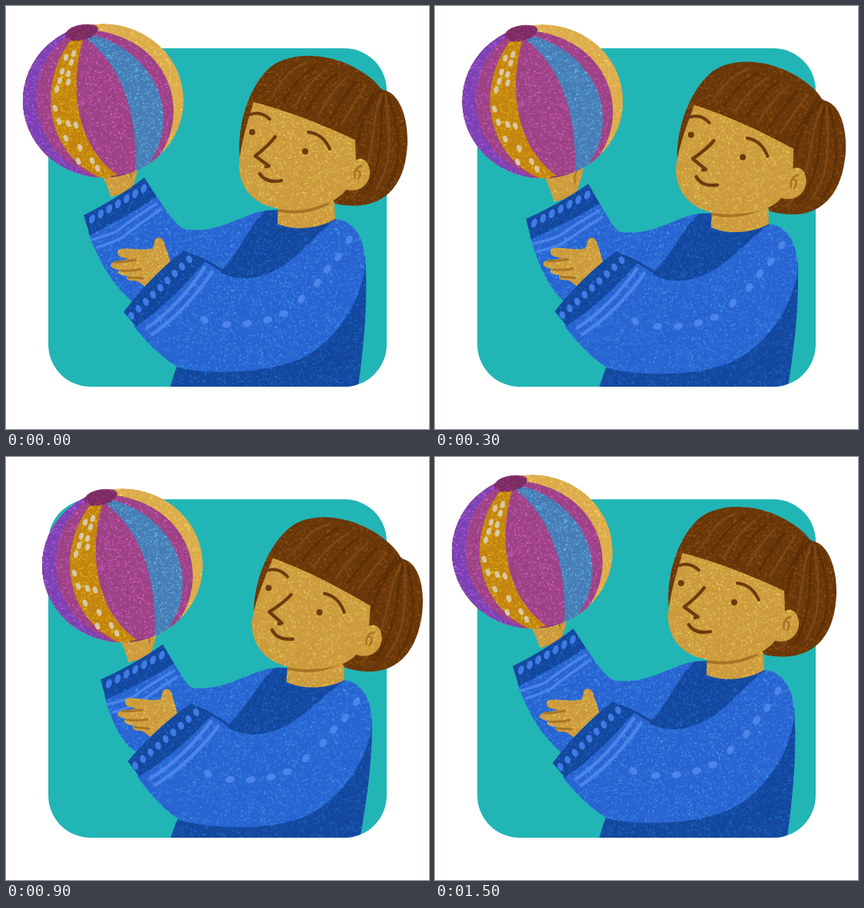
Animation of 550 by 550 pixels, one loop 2500 ms. Source, as an HTML page with a canvas:

```html
<!DOCTYPE html>
<html lang="en">
<head>
<meta charset="utf-8">
<title>Child with a beach ball</title>
<style>
html, body { margin: 0; width: 100%; height: 100%; overflow: hidden; background: #fff; }
canvas { display: block; }
</style>
</head>
<body>
<canvas id="stage" width="550" height="550"></canvas>
<script>
const ctx = document.getElementById('stage').getContext('2d');
const LOOP = 2500, STEP = 100;
const SKIN = '#cc9a3c', CREASE = '#a87526', HAIR = '#673609', LINE = '#6d3b0d';
const BLUE = '#2863d1', NAVY = '#13479d', TRIM = '#4c84ea', DOT = '#3f7ce6';

// step, ball x y, far hand x y turn, head turn, body turn
const KEYS = [
  [0, 0, 0, 0, 0, 0, 0, 0],
  [2, 0, -23, 12, -13, .07, .02, 0],
  [4, 27, 25, 23.5, 26.5, .02, .1, .055],
  [6, 27, 25, 23.5, 26.5, .02, .1, .055],
  [9, 25, 18, 22.5, 19, .04, .1, .055],
  [11, 12, 5, 10, 6, .03, .06, .027],
  [12, 0, 0, 0, 0, 0, .02, 0],
  [13, 0, 0, 0, 0, 0, .02, 0],
  [15, 0, 0, 0, 0, 0, 0, 0],
  [25, 0, 0, 0, 0, 0, 0, 0]
];

function poseAt(step) {
  const i = KEYS.findIndex(k => k[0] > step);
  const a = KEYS[i - 1], b = KEYS[i];
  const u = (step - a[0]) / (b[0] - a[0]);
  return a.map((v, n) => v + (b[n] - v) * u).slice(1);
}

let seed = 7;
const rnd = () => (seed = (seed * 16807) % 2147483647) / 2147483647;

function makeGrain() {
  const c = document.createElement('canvas');
  c.width = c.height = 220;
  const g = c.getContext('2d');
  for (let i = 0; i < 5000; i++) {
    g.fillStyle = `rgba(255,255,255,${.08 + .34 * rnd()})`;
    const s = 1 + rnd();
    g.fillRect(rnd() * 220, rnd() * 220, s, s);
  }
  return ctx.createPattern(c, 'repeat');
}
const grain = makeGrain();

function fill(d, color) {
  const p = new Path2D(d);
  ctx.fillStyle = color;
  ctx.fill(p);
  ctx.globalCompositeOperation = 'overlay';
  ctx.fillStyle = grain;
  ctx.fill(p);
  ctx.globalCompositeOperation = 'source-over';
}

function line(d, color, width) {
  ctx.strokeStyle = color;
  ctx.lineWidth = width;
  ctx.stroke(new Path2D(d));
}

function oval(x, y, rx, ry, turn, color) {
  ctx.fillStyle = color;
  ctx.beginPath();
  ctx.ellipse(x, y, rx, ry, turn, 0, 7);
  ctx.fill();
}

function group(x, y, turn, dx, dy, draw) {
  ctx.save();
  ctx.translate(x + dx, y + dy);
  ctx.rotate(turn);
  ctx.translate(-x, -y);
  draw();
  ctx.restore();
}

const turned = (x, y, cx, cy, a, dx = 0, dy = 0) => [
  cx + dx + (x - cx) * Math.cos(a) - (y - cy) * Math.sin(a),
  cy + dy + (x - cx) * Math.sin(a) + (y - cy) * Math.cos(a)
];

const BANDS = [
  ['M112 31C222 44 248 155 182 215', '#9d4185'],
  ['M110 37C196 58 235 150 178 215', '#467db7'],
  ['M103 41C155 80 172 150 168 217', '#9d4185'],
  ['M100 45C85 95 85 180 148 222', '#c4830f'],
  ['M86 42C40 100 50 190 122 223', '#9d4185'],
  ['M84 37C25 70 15 185 115 222', '#7b40b4']
];
const SEEDS = [[88, 62], [78, 67], [85, 73], [73, 85], [81, 88], [70, 97], [81, 99], [66, 108],
  [64, 133], [69, 150], [81, 153], [91, 155], [78, 172], [96, 184], [94, 202], [112, 201], [119, 211]];

function ball() {
  const outline = 'M22 123A104.5 100 0 0 1 231 123A104.5 100 0 0 1 22 123Z';
  ctx.save();
  ctx.clip(new Path2D(outline));
  fill(outline, '#dcab4a');
  for (const [edge, color] of BANDS) fill(edge + 'L100 240H0V0H90Z', color);
  for (const [x, y] of SEEDS) oval(x, y, 3, 4.6, x < 92 && y < 120 ? .25 : -.4, '#d8c8a0');
  line('M138 223Q165 221 186 210', '#7b2c62', 4);
  ctx.restore();
  fill('M77 38C78 27 100 21 116 25C125 30 117 41 101 44C89 47 78 45 77 38Z', '#7b2c62');
}

function farHand() {
  fill('M121 212L173 200C172 215 167 229 163 241L136 248C133 235 126 224 121 212Z', SKIN);
  line('M164 207Q160 216 163 222', CREASE, 2);
}

function farCuff() {
  line('M111 304Q130 299 144 293Q168 274 196 257M118 314Q138 308 151 301Q174 283 200 265', TRIM, 3.5);
  fill('M101 272Q142 252 180 223L196 248Q152 277 109 298Z', NAVY);
  for (let i = 0; i < 7; i++) oval(112 + 11.2 * i, 277 - 6.6 * i, 3.6, 6, .3, DOT);
}

function farSleeve(dx, dy, turn, lean) {
  const cuff = (x, y) => turned(x, y, 145, 260, turn, dx, dy);
  const body = (x, y) => turned(x, y, 195, 495, lean);
  const mid = (x, y, k) => [x + dx * k, y + dy * k];
  fill(`M${cuff(194, 245)}C${cuff(213, 272)} ${mid(224, 292, .55)} ${mid(240, 291, .5)}` +
    `C${mid(285, 294, .4)} ${body(310, 267)} ${body(345, 265)}L${body(300, 350)}L${body(200, 400)}` +
    `L${body(165, 385)}C${mid(140, 365, .5)} ${cuff(119, 330)} ${cuff(107, 294)}Z`, BLUE);
}

function torso() {
  fill('M338 266C322 276 305 318 281 343L222 468L204 525H454C466 440 471 385 467 325L430 278L400 262Z', NAVY);
  fill('M354 250L353 283C370 292 405 291 428 277L426 235Z', SKIN);
  line('M355 266Q388 272 418 257', CREASE, 4);
}

const SLEEVE_DOTS = [[258, 408], [287, 414], [314, 413], [340, 408], [361, 400],
  [384, 381], [405, 360], [418, 342], [432, 326], [446, 304]];

function nearArm() {
  fill('M214 333C211 322 207 313 205 306C202 299 193 300 193 307L191 315C178 319 164 314 148 316' +
    'C143 319 145 326 151 327L160 329L140 333C133 336 136 342 148 343C143 346 146 350 158 351' +
    'C155 356 161 358 167 357C173 358 177 362 181 365L190 372Z', SKIN);
  line('M142 333Q156 333 168 330M150 344Q164 345 175 342M159 353L178 354', CREASE, 3);
  fill('M430 277C452 280 468 300 467 340C460 390 425 440 380 460C335 478 265 480 225 470' +
    'C205 460 180 435 166 416L247 328C275 343 285 355 315 354C370 348 390 305 430 277Z', BLUE);
  line('M240 323Q262 331 284 346', NAVY, 3);
  line('M183 419Q225 390 258 340M190 427Q233 397 268 346', TRIM, 4.5);
  fill('M153 398Q189 350 231 318L259 332Q218 382 169 417Z', NAVY);
  for (let i = 0; i < 9; i++) oval(163 + 9.4 * i, 403 - 9.2 * i, 3.7, 5.2, -.35, DOT);
  for (const [x, y] of SLEEVE_DOTS) oval(x, y, 4.3, 6, x < 270 ? -.9 : x < 380 ? 1.3 : .5, TRIM);
}

function head() {
  fill('M304 197C300 152 317 107 338 85C358 62 405 58 445 76C465 85 482 98 488 109' +
    'C512 110 523 147 522 178C520 235 490 270 428 257L400 200Z', HAIR);
  ctx.globalAlpha = .45;
  for (let i = 0; i < 8; i++) {
    line(`M${390 + 13 * i} ${73 + 5 * i}Q${362 + 15 * i} ${86 + 7 * i} ${346 + 15 * i} ${118 + 6 * i}`,
      i % 2 ? '#4d2504' : '#8d5a2a', 3);
  }
  for (let i = 0; i < 4; i++) {
    line(`M${488 + 3 * i} 118C${472 + 12 * i} 150 ${484 + 12 * i} 195 ${452 + 15 * i} ${248 - 5 * i}`,
      i % 2 ? '#4d2504' : '#8d5a2a', 3);
  }
  line('M488 109Q466 132 457 176', '#4d2504', 4);
  ctx.globalAlpha = 1;
  fill('M322 125C314 150 305 180 303 205C302 240 328 264 365 264C400 264 430 256 442 239' +
    'C460 243 474 232 473 214C471 199 462 196 455 200L454 174C420 158 370 137 322 125Z', SKIN);
  line('M318 141Q331 136 343 147M393 164Q412 166 421 186', LINE, 4);
  line('M350 170Q341 182 324 195L342 208L338 209M330 218Q338 231 358 227', LINE, 4.3);
  oval(320, 164, 4, 4, 0, LINE);
  oval(389, 189, 4, 4, 0, LINE);
  line('M462 208Q451 211 454 224M456 214Q464 215 458 225', CREASE, 2.5);
}

function backdrop() {
  ctx.fillStyle = '#fff';
  ctx.fillRect(0, 0, 550, 550);
  ctx.fillStyle = '#22b5b5';
  ctx.beginPath();
  ctx.roundRect(55, 55, 440, 440, 55);
  ctx.fill();
}

function draw(step) {
  const [bx, by, ax, ay, turn, nod, lean] = poseAt(step);
  ctx.lineCap = ctx.lineJoin = 'round';
  backdrop();
  ctx.save();
  ctx.beginPath();
  ctx.roundRect(55, -100, 440, 595, 55);
  ctx.clip();
  group(145, 260, turn, ax, ay, farHand);
  farSleeve(ax, ay, turn, lean);
  group(145, 260, turn, ax, ay, farCuff);
  group(195, 495, lean, 0, 0, torso);
  group(195, 495, lean, 0, 0, nearArm);
  ctx.restore();
  group(269, 381, nod, 0, 0, head);
  group(0, 0, 0, bx, by, ball);
}

const start = performance.now();
let shown = -1;
function frame() {
  const step = Math.floor((performance.now() - start) % LOOP / STEP);
  if (step !== shown) draw(shown = step);
  requestAnimationFrame(frame);
}
frame();
</script>
</body>
</html>
```
